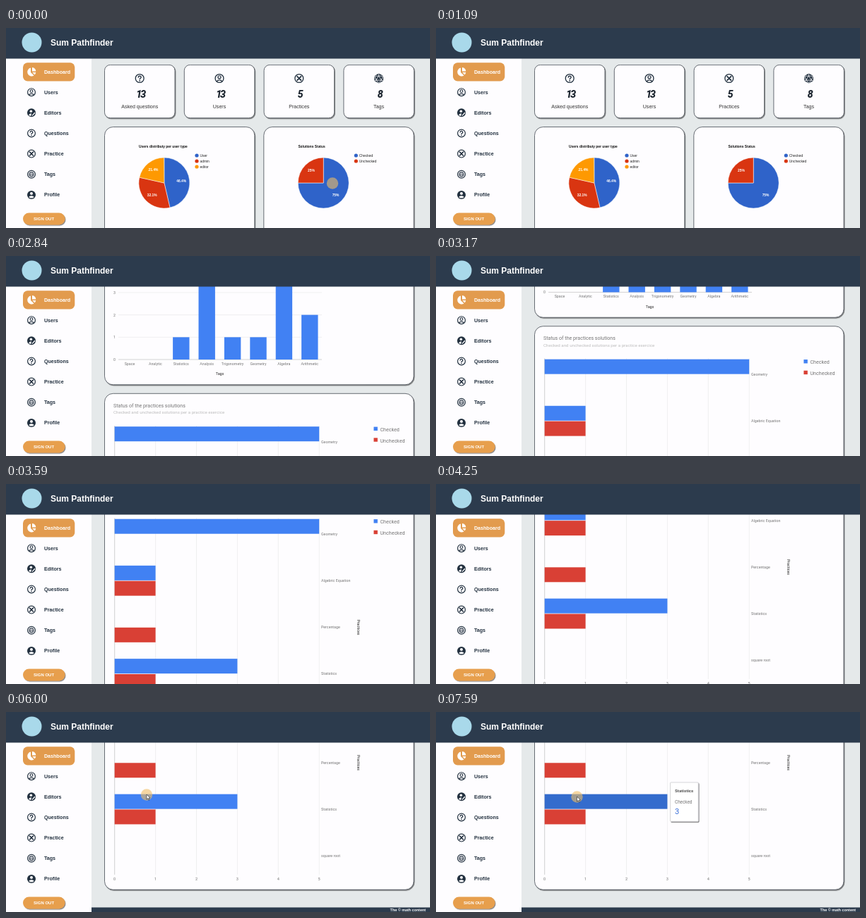
These frames come from a looping animation (600x284 px, 7680 ms). An HTML page:

```html
<!DOCTYPE html>
<html lang="en">
<head>
<meta charset="utf-8">
<title>Dashboard</title>
<style>
  html, body { margin: 0; width: 100%; height: 100%; overflow: hidden; background: #e5e9ea; }
  svg { display: block; width: 100%; height: 100%; }
  text { font-family: "Liberation Sans", Arial, sans-serif; }
  .chart text, text.chart { font-family: Roboto, sans-serif; }
  .bold { font-weight: bold; }
  .count { font: italic 900 14px Roboto, sans-serif; letter-spacing: -2px; }
  .card { fill: #fefdff; stroke: #454b53; stroke-width: .8; filter: url(#shadow); }
  .line { fill: none; stroke-linecap: round; stroke-linejoin: round; }
</style>
</head>
<body>
<svg id="stage" viewBox="0 0 600 284" xmlns="http://www.w3.org/2000/svg"></svg>
<script>
const LOOP = 7680, FPS = 12;
const NAVY = '#2c3b4d', INK = '#22303f', PAPER = '#fefdff', GREY = '#757575';
const BLUE = '#4181f3', RED = '#d94035', HOVER_BLUE = '#346ccd';
const PIE = { blue: '#2f63c9', red: '#d93511', orange: '#fe9902' };

// y is the middle of the line of text
const text = (s, x, y, size, fill, { anchor = 'start', cls = '', extra = '' } = {}) =>
  `<text x="${x}" y="${y + size * .36}" font-size="${size}" fill="${fill}" text-anchor="${anchor}" class="${cls}" ${extra}>${s}</text>`;
const rect = (x, y, w, h, fill, extra = '') =>
  `<rect x="${x}" y="${y}" width="${w}" height="${h}" fill="${fill}" ${extra}/>`;
const circle = (x, y, r, fill, extra = '') =>
  `<circle cx="${x}" cy="${y}" r="${r}" fill="${fill}" ${extra}/>`;
const line = (x1, y1, x2, y2, stroke, width = .5) =>
  `<path d="M${x1} ${y1}L${x2} ${y2}" stroke="${stroke}" stroke-width="${width}"/>`;
const card = (x, y, w, h, r) =>
  `<rect class="card" x="${x}" y="${y}" width="${w}" height="${h}" rx="${r}"/>`;
const middle = { anchor: 'middle' };

// Icons live in a circle of radius 6
const ring = circle(0, 0, 5.4, 'none', `stroke="${INK}" stroke-width="1.2"`);
const disc = circle(0, 0, 6, INK);
const stroke = (d, color = INK, width = 1.2) =>
  `<path class="line" d="${d}" stroke="${color}" stroke-width="${width}"/>`;
const icons = {
  pie: `<path fill="#fff" d="M-1 -5.4V1L3.6 5.4A6 6 0 1 1 -1 -5.4ZM1 -6A6 6 0 0 1 6.3 -.4H1ZM1.3 1H6.3A6 6 0 0 1 4.6 4.4Z"/>`,
  user: ring + circle(0, -1.5, 1.9, 'none', `stroke="${INK}" stroke-width="1.1"`) + stroke('M-3.4 4C-2.4 1.6 2.4 1.6 3.4 4'),
  editor: disc + circle(-.6, -2, 1.8, PAPER) + `<path fill="${PAPER}" d="M-4 3.6Q-3 .8 0 .9L-.6 4.6Z"/>` + stroke('M1.3 3.8L4.6 .2', PAPER, 1.3),
  question: ring + stroke('M-1.8 -1.4C-1.7 -3.6 1.9 -3.5 1.8 -1.3C1.7 0 0 0 0 1.2', INK, 1.3) + circle(0, 3.1, .8, INK),
  practice: ring + stroke('M-2.4 -2.4L2.4 2.4M2.4 -2.4L-2.4 2.4', INK, 1.7),
  tags: ring + circle(0, 0, 3.7, '#59636f') + stroke('M-2.2 -.9H2.2M-1.2 1.5H1.2M0 -2.4V1.5', PAPER, .7),
  profile: disc + circle(0, -1.9, 2, PAPER) + `<path fill="${PAPER}" d="M-3.7 3.4C-2.6 .6 2.6 .6 3.7 3.4Q0 6 -3.7 3.4Z"/>`,
  solid: `<path fill="${INK}" d="M0 -6.4L5.7 -3.2V3.2L0 6.4L-5.7 3.2V-3.2Z"/>` +
    stroke('M0 -3L3.2 2.4H-3.2ZM0 -6V-3M-5.4 -3L0 -3L5.4 -3M-5.4 -3L-3.2 2.4L-5.4 3M5.4 -3L3.2 2.4L5.4 3M-3.2 2.4L0 6L3.2 2.4', PAPER, .7),
};
const icon = (name, x, y, scale = 1) => `<g transform="translate(${x} ${y}) scale(${scale})">${icons[name]}</g>`;

function summaryCards() {
  const items = [['question', '13', 'Asked questions'], ['user', '13', 'Users'],
                 ['practice', '5', 'Practices'], ['solid', '8', 'Tags']];
  return items.map(([name, count, label], i) => {
    const x = 139.5 + i * 112.8, mid = x + 49.7;
    return card(x, 52.4, 99.5, 75.4, 8) + icon(name, mid, 71.5, 1.1) +
      text(count, mid + 1, 94, 14, '#1d2630', { anchor: 'middle', cls: 'count' }) +
      text(label, mid, 111, 7.1, '#333', middle);
  }).join('');
}

function pieCard(x, title, slices) {
  const cx = x + 84.4, cy = 220, R = 36;
  const at = (turn, r) => [cx + r * Math.sin(turn * 2 * Math.PI), cy - r * Math.cos(turn * 2 * Math.PI)];
  let out = card(x, 140.5, 212.3, 158.5, 12) + text(title, x + 48.6, 168, 4.85, '#111', { cls: 'bold' });
  let start = 0;
  slices.forEach(([label, percent, color], i) => {
    const end = start + percent / 100, [lx, ly] = at((start + end) / 2, 24.5);
    out += `<path d="M${cx} ${cy}L${at(start, R)}A${R} ${R} 0 ${percent > 50 ? 1 : 0} 1 ${at(end, R)}Z" fill="${color}" stroke="#fff" stroke-width=".5"/>` +
      text(percent + '%', lx, ly, 4.9, '#fff', { anchor: 'middle', cls: 'bold' }) +
      circle(x + 130.5, 181 + i * 8, 2.6, color) + text(label, x + 135, 181 + i * 8, 4.9, '#222');
    start = end;
  });
  return out;
}

function tagsChart() {
  const data = { Space: 0, Analytic: 0, Statistics: 1, Analysis: 4, Trigonometry: 1, Geometry: 1, Algebra: 4, Arithmetic: 2 };
  const base = 480, unit = 31.7;
  let out = card(139.5, 311.3, 437.5, 204.5, 12) +
    text('Distribution of practices per tags', 152, 328, 7.1, GREY);
  for (let v = 0; v <= 4; v++) {
    const y = base - v * unit;
    out += line(159, y, 447, y, v ? '#e0e0e0' : '#a5a5a5') + text(v, 155, y, 5.3, GREY, { anchor: 'end' });
  }
  Object.entries(data).forEach(([name, v], i) => {
    const x = 175 + i * 36.4;
    out += rect(x - 11.7, base - v * unit, 23.4, v * unit, BLUE) + text(name, x, base + 6, 5.3, GREY, middle);
  });
  return out + text('Tags', 302.5, 500.5, 5.3, '#222', middle);
}

function solutionsChart() {
  const data = [['Geometry', 5, 0], ['Algebric Equation', 1, 1], ['Percentage', 0, 1], ['Statistics', 3, 1], ['square root', 0, 0]];
  const left = 153.7, unit = 57.9;
  let out = card(139.5, 528.3, 437.5, 381, 12) +
    text('Status of the practices solutions', 152, 545, 7.1, GREY) +
    text('Checked and unchecked solutions per a practice exercice', 152, 555, 6.2, '#bdbdbd');
  for (let v = 0; v <= 5; v++) {
    const x = left + v * unit;
    out += line(x, 574, x, 888, v ? '#e0e0e0' : '#a5a5a5') + text(v, x, 894, 5.6, GREY, middle);
  }
  data.forEach(([name, checked, unchecked], i) => {
    const y = 596.6 + i * 66.15;
    out += rect(left, y - 21.4, checked * unit, 21, BLUE, name === 'Statistics' ? 'id="hoverBar"' : '') +
      rect(left, y + .4, unchecked * unit, 21, RED) + text(name, 446, y, 5.3, GREY);
  });
  [['Checked', BLUE], ['Unchecked', RED]].forEach(([name, color], i) => {
    const y = 579 + i * 15.7;
    out += rect(520.4, y - 3.4, 5.4, 5.4, color) + text(name, 529.5, y + .3, 7.1, GREY);
  });
  return out + text('Practices', 0, 0, 5.3, '#222', { anchor: 'middle', extra: 'transform="translate(499 729) rotate(90)"' });
}

function sidebar() {
  const items = [['pie', 'Dashboard'], ['user', 'Users'], ['editor', 'Editors'], ['question', 'Questions'],
                 ['practice', 'Practice'], ['tags', 'Tags'], ['profile', 'Profile']];
  return rect(0, 43, 121, 241, PAPER) + rect(24, 49.3, 73.3, 26.2, '#e29b4e', 'rx="6.5"') +
    items.map(([name, label], i) => icon(name, 36, 62 + i * 29.15) +
      text(label, 54, 62 + i * 29.15, 7.1, i ? INK : '#fff', { cls: 'bold' })).join('') +
    rect(24, 262.4, 59.5, 17, '#e79f4d', 'rx="8.5" filter="url(#shadow)"') +
    text('SIGN OUT', 53.6, 270.8, 6, '#fff', { anchor: 'middle', cls: 'bold' });
}

const header = rect(0, 0, 600, 43.5, NAVY) + circle(36.5, 20.5, 14, '#a9d9ea') +
  text('Sum Pathfinder', 63, 20.8, 12, '#fff', { cls: 'bold' });

const footer = rect(121, 934.5, 479, 7, NAVY) +
  text('The © math content', 594, 937.8, 5.4, '#fff', { anchor: 'end', cls: 'bold' });

const tooltip = `<g id="tooltip" class="chart">${rect(331.5, 100, 39.7, 55.4, '#fff', 'rx="1" stroke="#c4c4c8" stroke-width=".7" filter="url(#shadow)"')}` +
  text('Statistics', 338, 111.5, 6.2, '#555', { cls: 'bold' }) + text('Checked', 338, 128, 6.35, GREY) +
  text('3', 338, 141, 11, '#3a6fd8') + '</g>';

const pointer = `<g id="pointer">${circle(0, 0, 8.2, '#f0be64', 'fill-opacity=".6"')}` +
  '<path id="arrow" d="M0 -.5V6.6L1.7 5.1L2.9 7.8L4 7.3L2.8 4.7H5Z" fill="#fff" stroke="#222" stroke-width=".6"/></g>';

const $ = id => document.getElementById(id);
$('stage').innerHTML = `<defs><filter id="shadow" x="-10%" y="-10%" width="125%" height="130%">
  <feDropShadow dx="1" dy="1.2" stdDeviation=".7" flood-color="#333" flood-opacity=".6"/></filter></defs>` +
  rect(0, 0, 600, 284, '#e5e9ea') +
  `<g id="page">${summaryCards()}` +
  pieCard(139.5, 'Users distributy per user type', [['User', 46.4, PIE.blue], ['admin', 32.1, PIE.red], ['editor', 21.4, PIE.orange]]) +
  pieCard(364.8, 'Solutions Status', [['Checked', 75, PIE.blue], ['Unchecked', 25, PIE.red]]) +
  `<g class="chart">${tagsChart()}${solutionsChart()}</g>${footer}</g>` +
  sidebar() + header + tooltip + pointer;

// Keys are [step, value]; smooth joins them with Hermite curves that rest at both ends
function track(keys, step, smooth) {
  const last = keys.length - 1;
  if (step <= keys[0][0]) return keys[0][1];
  if (step >= keys[last][0]) return keys[last][1];
  const i = keys.findIndex(key => key[0] > step) - 1;
  const [x0, y0] = keys[i], [x1, y1] = keys[i + 1], w = x1 - x0, t = (step - x0) / w;
  if (!smooth) return y0 + (y1 - y0) * t;
  const slope = j => j <= 0 || j >= last ? 0 : (keys[j + 1][1] - keys[j - 1][1]) / (keys[j + 1][0] - keys[j - 1][0]);
  const s = t * t * (3 - 2 * t);
  return y0 + (y1 - y0) * s + w * t * (1 - t) * ((1 - t) * slope(i) - t * slope(i + 1));
}

const SCROLL = [[22, 0], [25, 67], [34, 333], [43, 525.5], [51, 611], [58, 657]];
const POINTER_X = [[3, 462], [10, 612], [58, 612], [64, 568], [72, 199], [73, 199.5]];
const POINTER_Y = [[3, 220.5], [10, 165], [58, 190], [64, 180], [72, 117.5], [73, 120.5]];
const HOVER_STEP = 73;

function draw(now) {
  const time = Math.floor(now % LOOP / 10) * 10;
  const step = Math.floor(time * FPS / 1000);
  const hovering = step >= HOVER_STEP;
  $('page').setAttribute('transform', `translate(0 ${-track(SCROLL, step, true)})`);
  $('pointer').setAttribute('transform', `translate(${track(POINTER_X, step)} ${track(POINTER_Y, step)})`);
  $('arrow').style.display = step > 3 ? '' : 'none';
  $('tooltip').style.display = hovering ? '' : 'none';
  $('hoverBar').setAttribute('fill', hovering ? HOVER_BLUE : BLUE);
}

(function tick() {
  draw(performance.now());
  requestAnimationFrame(tick);
})();
</script>
</body>
</html>
```
